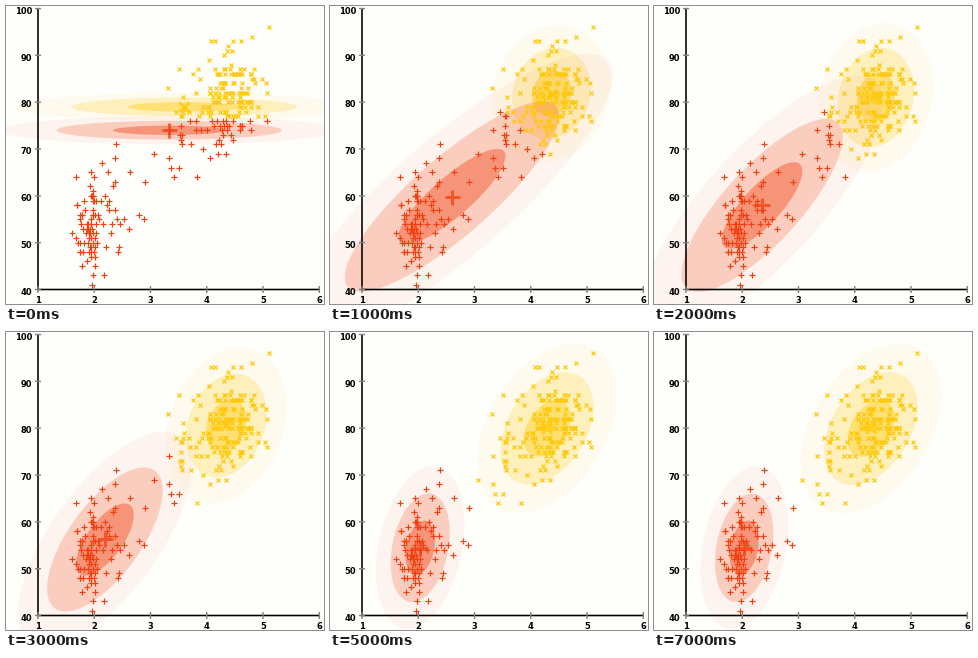
Animation of 318x298 px, one loop 7.5 s. Source, as a matplotlib script:

```python
import numpy as np
import matplotlib.pyplot as plt
from matplotlib.animation import FuncAnimation
from matplotlib.patches import Polygon

W, H, DPI = 318, 298, 100
PX = 72 / DPI
FRAMES, INTERVAL = 15, 500
RED, GOLD, PAPER = "#f04010", "#ffc808", "#fefefb"

# Stray observations around the two sampled groups
SHORT = [(2.383, 71), (2.133, 67), (2.633, 65), (2.9, 63), (2.883, 55),
         (2.8, 56), (2.617, 53), (1.667, 64), (1.6, 52), (1.983, 43)]
LONG = [(3.067, 69), (3.333, 74), (3.333, 68), (3.367, 66), (3.5, 66),
        (3.417, 64), (3.833, 64), (3.567, 73), (3.567, 71), (3.717, 71),
        (3.317, 83), (3.5, 87), (3.45, 78), (3.6, 79), (4.083, 93),
        (4.617, 93), (4.8, 94), (5.1, 96), (5.067, 76), (5.033, 77)]


def sx(x):
    return 32 + 56.25 * (np.asarray(x) - 1)


def sy(y):
    return 283.5 - 4.683 * (np.asarray(y) - 40)


def covariance(dx, dy, rho):
    return np.array([[dx * dx, rho * dx * dy], [rho * dx * dy, dy * dy]])


def group(rng, strays, total, mean, cov, skew):
    """Fill up the strays with samples so the whole group has this mean and covariance."""
    strays, mean = np.array(strays), np.array(mean)
    n = total - len(strays)
    core_mean = (total * mean - strays.sum(0)) / n
    moment = (total * (cov + np.outer(mean, mean)) - strays.T @ strays) / n
    core_cov = moment - np.outer(core_mean, core_mean)

    z = rng.normal(size=(4 * n, 2))
    z = z[np.hypot(*z.T) < 2.1][:n]
    z[:, 0] = np.expm1(skew * z[:, 0]) / skew
    z -= z.mean(0)
    z = z @ np.linalg.inv(np.linalg.cholesky(np.cov(z.T, bias=True))).T
    core = core_mean + z @ np.linalg.cholesky(core_cov).T
    core = np.column_stack([np.round(core[:, 0] * 60) / 60, np.round(core[:, 1])])
    return np.vstack([strays, core])


rng = np.random.default_rng(7)
data = np.vstack([
    group(rng, SHORT, 97, (2.036, 54.48), covariance(.263, 5.8, .285), .4),
    group(rng, LONG, 175, (4.29, 79.97), covariance(.412, 6.0, .38), -.1),
])


def log_density(mean, cov, share):
    d = data - mean
    q = np.sum(d @ np.linalg.inv(cov) * d, axis=1)
    return np.log(share) - np.log(np.linalg.det(cov)) / 2 - q / 2


def red_chance(fits):
    red, gold = (log_density(*f) for f in fits)
    return 1 / (1 + np.exp(gold - red))


def refit(weight):
    mean = weight @ data / weight.sum()
    d = data - mean
    return mean, (d.T * weight) @ d / weight.sum(), weight.mean()


def expectation_maximization(steps):
    fits = [(np.array((3.333, 74)), np.eye(2), .5), (np.array((3.6, 79)), np.eye(2), .5)]
    history = []
    for _ in range(steps):
        chance = red_chance(fits)
        history.append((fits, chance > .5))
        fits = [refit(chance), refit(1 - chance)]
    return history


history = expectation_maximization(FRAMES)

fig = plt.figure(figsize=(W / DPI, H / DPI), dpi=DPI, facecolor=PAPER)
ax = fig.add_axes([0, 0, 1, 1])
ax.set(xlim=(0, W), ylim=(H, 0))
ax.axis("off")


def markers(color, shape, size, width, z, alpha=1):
    return ax.plot([], [], ls="none", marker=shape, color=color, ms=size * PX,
                   mew=width * PX, alpha=alpha, zorder=z)[0]


def cluster(color, shape, size, mean_size, z):
    rings = []
    for k, alpha in ((3, .05), (2, .21), (1, .4)):
        ring = Polygon(np.zeros((3, 2)), fc=color, ec="none", alpha=alpha, zorder=z)
        rings.append((k, ax.add_patch(ring)))
    return rings, markers(color, shape, mean_size, 3, 4, .75), markers(color, shape, size, 1.2, 5)


red = cluster(RED, "+", 6, 15, 2)
gold = cluster(GOLD, "x", 4.5, 10, 1)


def line(xs, ys, color, width, z):
    ax.plot(xs, ys, color=color, lw=width * PX, zorder=z,
            solid_capstyle="butt", snap=False)


def label(x, y, text, align):
    ax.text(x, y, text, ha=align, va="center_baseline", family="DejaVu Sans",
            weight="bold", size=8.4 * PX, color="black", zorder=8)


line([32, 32], [2, 284], "black", 1.6, 6)
line([31, 314], [283.5, 283.5], "black", 1.6, 6)
for v in range(1, 7):
    line([sx(v)] * 2, [280, 287], "#808080", 1.4, 7)
    label(sx(v), 293.5, str(v), "center")
for v in range(40, 101, 10):
    line([29, 35], [sy(v)] * 2, "#808080", 1.4, 7)
    label(26, sy(v) + 1.7, str(v), "right")

angle = np.linspace(0, 2 * np.pi, 160, endpoint=False)
circle = np.column_stack([np.cos(angle), np.sin(angle)])


def draw(step):
    fits, is_red = history[step]
    for (mean, cov, _), (rings, cross, dots), mask in zip(fits, (red, gold), (is_red, ~is_red)):
        unit = circle @ np.linalg.cholesky(cov).T
        for k, ring in rings:
            x, y = (mean + k * unit).T
            ring.set_xy(np.column_stack([sx(x), sy(y)]))
        cross.set_data([sx(mean[0])], [sy(mean[1])])
        dots.set_data(sx(data[mask, 0]), sy(data[mask, 1]))
    return []


anim = FuncAnimation(fig, draw, frames=FRAMES, interval=INTERVAL,
                     repeat=True, repeat_delay=0, blit=False)
plt.show()
```
